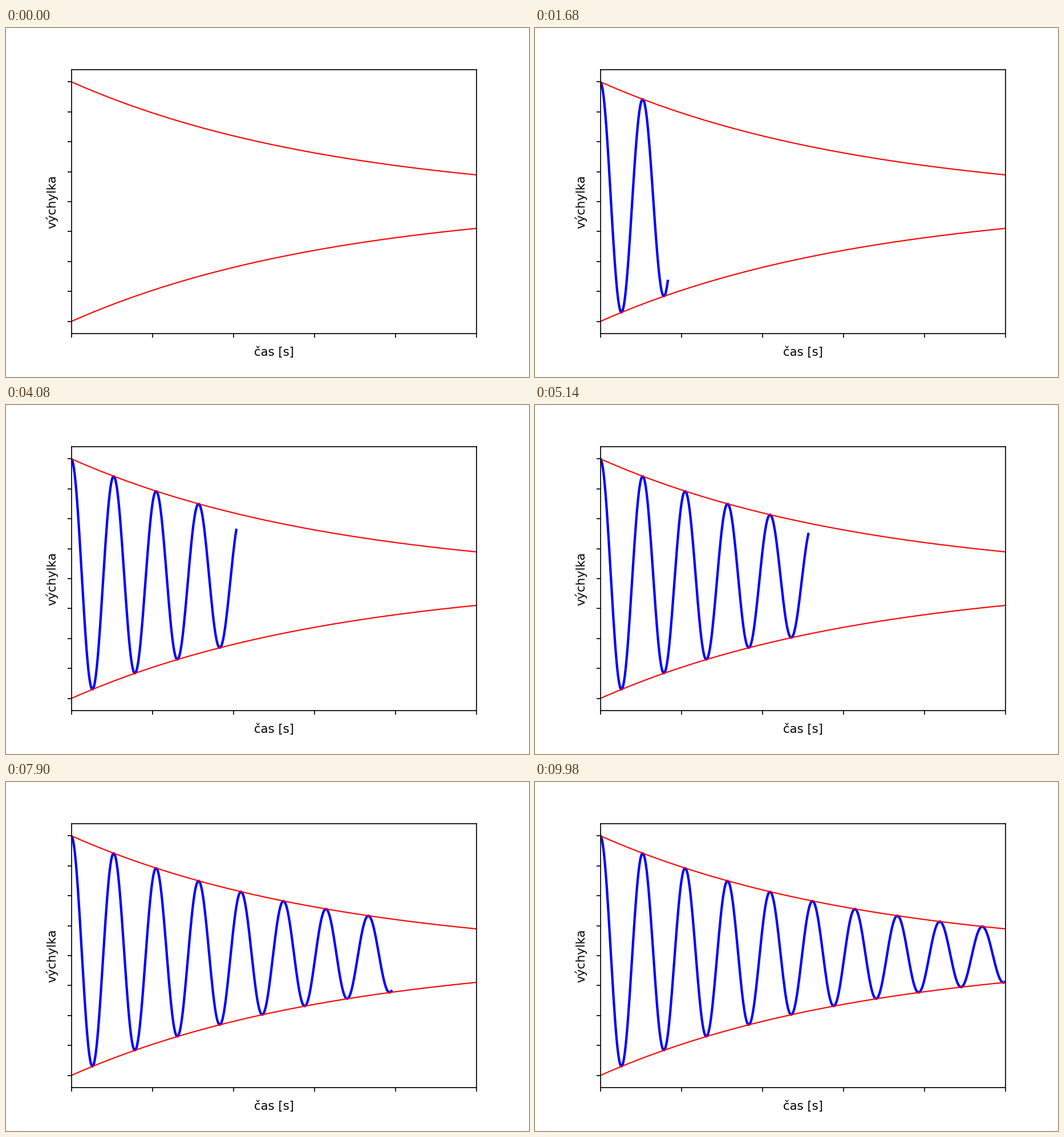
Recreate the animation shown at these times as a matplotlib script. Size 917 by 611 pixels, loop 10000 ms.

```python
import numpy as np
import matplotlib.pyplot as plt
from matplotlib.animation import FuncAnimation

WIDTH, HEIGHT = 917, 611
DPI = HEIGHT / 4
FRAMES, INTERVAL = 500, 20
DAMPING, OMEGA = 0.15, 6

t = np.linspace(0, 10, FRAMES)
envelope = np.exp(-DAMPING * t)
swing = envelope * np.cos(OMEGA * t)

# The tiny margin keeps the pixel width from being truncated.
fig = plt.figure(figsize=((WIDTH + 1e-6) / DPI, HEIGHT / DPI), dpi=DPI,
                 facecolor="white")
fig.subplots_adjust(left=0.125, right=0.9, bottom=0.125, top=0.88)
ax = fig.add_subplot()
ax.set(xlim=(0, 10), ylim=(-1.1, 1.1),
       xticks=np.arange(0, 11, 2), yticks=np.linspace(-1, 1, 9))
# Empty labels keep their padding, which places the axis titles.
ax.set_xticklabels([])
ax.set_yticklabels([])
ax.set_xlabel("čas [s]", fontsize=10, family="DejaVu Sans")
ax.set_ylabel("výchylka", fontsize=10, family="DejaVu Sans")

curve, = ax.plot([], [], color="blue", lw=2)
for sign in (1, -1):
    ax.plot(t, sign * envelope, color="red", lw=1)


def update(i):
    curve.set_data(t[:i], swing[:i])
    return curve,


anim = FuncAnimation(fig, update, frames=FRAMES, interval=INTERVAL,
                     repeat=True, repeat_delay=0)
plt.show()
```
